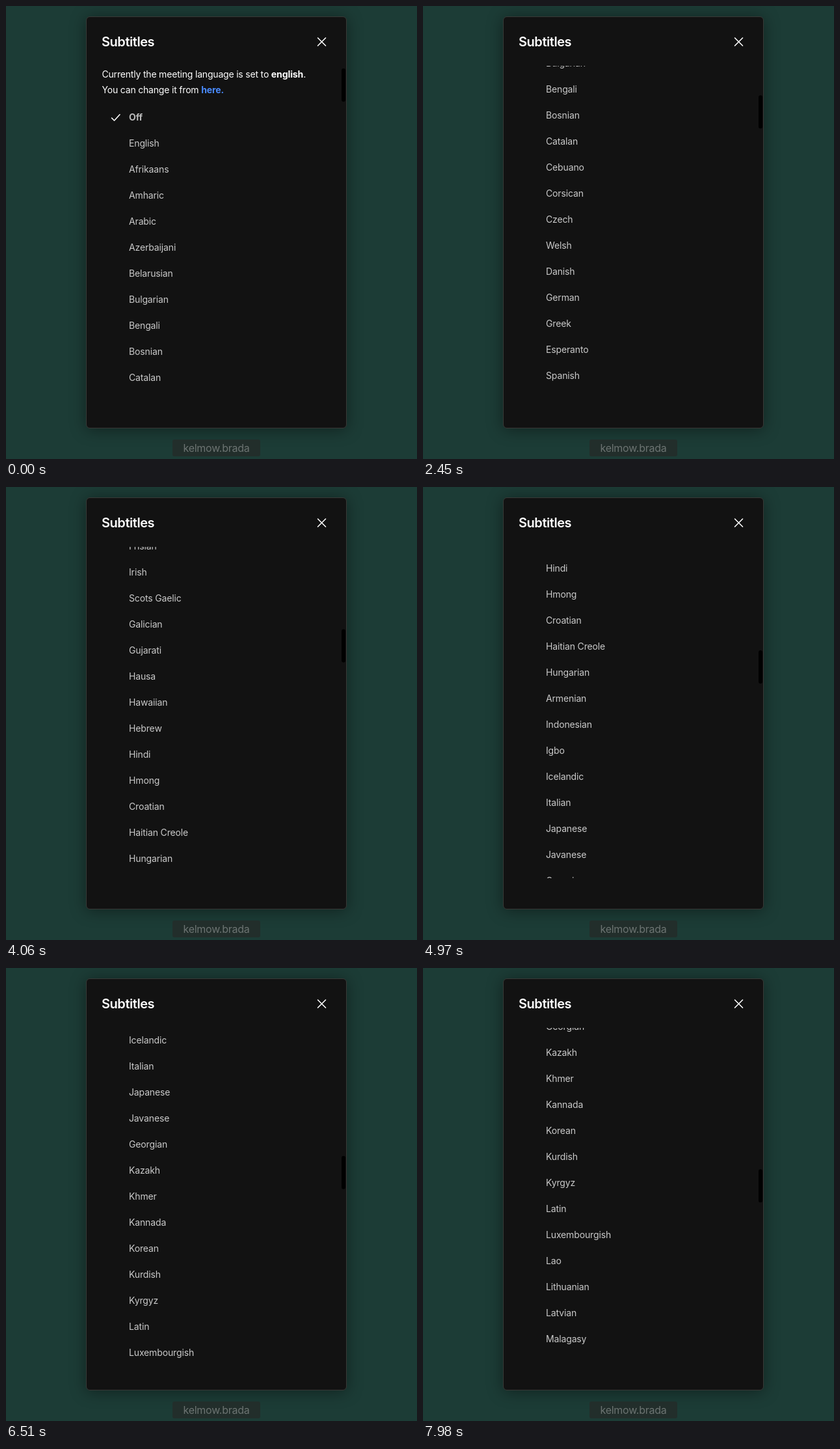
An HTML page that plays this animation: 632x696 px, repeating every 8000 ms.

```html
<!DOCTYPE html>
<html lang="en">
<head>
<meta charset="utf-8">
<title>Subtitles</title>
<style>
  html, body { margin: 0; width: 100%; height: 100%; overflow: hidden; background: #1c3c36; }
  body { position: relative; font: 14px/24px Inter, "Liberation Sans", sans-serif; color: #fff; }
  .panel {
    position: absolute; left: 123px; top: 16px; width: 399px; height: 631px;
    background: #121212; border: 1px solid #383a37; border-radius: 6px;
    box-shadow: 0 2px 24px rgba(0, 0, 0, .42);
  }
  h1 {
    position: absolute; left: 147px; top: 40px; margin: 0;
    font-size: 20px; line-height: 31px; font-weight: 600; letter-spacing: -.45px;
  }
  svg { position: absolute; overflow: visible; fill: none; stroke: #fff; stroke-width: 1.6; stroke-linecap: round; stroke-linejoin: round; }
  .close { left: 479px; top: 48px; }
  .view { position: absolute; left: 124px; top: 92px; width: 390px; height: 509px; overflow: hidden; }
  .content { position: absolute; left: 0; top: 0; width: 100%; }
  p { position: absolute; left: 23.5px; top: 1px; margin: 0; white-space: nowrap; letter-spacing: -.19px; }
  b { font-weight: 700; letter-spacing: -.1px; }
  .link { color: #4a8bff; }
  .check { left: 38px; top: 74px; }
  ul { position: absolute; left: 65px; top: 59px; margin: 0; padding: 0; list-style: none; }
  li { height: 40px; line-height: 40px; white-space: nowrap; color: #cacaca; letter-spacing: -.14px; }
  li:first-child { font-weight: 700; color: #b9b9b9; }
  .thumb { position: absolute; left: 516px; top: 96px; width: 6px; height: 51px; border-radius: 3px; background: #000; }
  .tag {
    position: absolute; left: 256px; top: 666px; width: 135px; height: 26px; border-radius: 3px;
    background: #222e2b; color: #6c7472; text-align: center; font-size: 16px; line-height: 26px; letter-spacing: -.25px;
  }
</style>
</head>
<body>
<div class="panel"></div>
<h1>Subtitles</h1>
<svg class="close" width="13" height="14"><path d="M0.5 1L12.5 13M12.5 1L0.5 13"/></svg>
<div class="view">
  <div class="content" id="content">
    <p>Currently the meeting language is set to <b>english</b>.<br>You can change it from <b class="link">here.</b></p>
    <svg class="check" width="13" height="11"><path d="M0.5 6L4.5 10L13 0.8"/></svg>
    <ul id="list"></ul>
  </div>
</div>
<div class="thumb" id="thumb"></div>
<div class="tag">kelmow.brada</div>
<script>
  const LOOP = 8000, TICK = 70, THUMB_RATIO = 0.1134;

  const languages = `Off,English,Afrikaans,Amharic,Arabic,Azerbaijani,Belarusian,Bulgarian,Bengali,Bosnian,
    Catalan,Cebuano,Corsican,Czech,Welsh,Danish,German,Greek,Esperanto,Spanish,Estonian,Basque,Persian,
    Finnish,French,Frisian,Irish,Scots Gaelic,Galician,Gujarati,Hausa,Hawaiian,Hebrew,Hindi,Hmong,Croatian,
    Haitian Creole,Hungarian,Armenian,Indonesian,Igbo,Icelandic,Italian,Japanese,Javanese,Georgian,Kazakh,
    Khmer,Kannada,Korean,Kurdish,Kyrgyz,Latin,Luxembourgish,Lao,Lithuanian,Latvian,Malagasy,Maori,Macedonian`;

  // Each swipe: start in ms, number of ticks, scroll offset reached.
  const swipes = [
    [490, 8, 64], [1120, 7, 220.1], [1680, 7, 300], [2310, 5, 375],
    [2940, 7, 735], [3710, 8, 1103], [4550, 7, 1366.5], [5530, 6, 1688],
    [6230, 12, 1706.2], [7210, 5, 1784], [7770, 4, 1881.5]
  ];

  const content = document.getElementById('content');
  const thumb = document.getElementById('thumb');
  const list = document.getElementById('list');
  for (const name of languages.split(',')) {
    list.appendChild(document.createElement('li')).textContent = name.trim();
  }

  const easeOut = u => 1 - (1 - u) ** 2;

  function scrollAt(ms) {
    const tick = Math.floor(ms / TICK + 1e-6);
    let pos = 0;
    for (const [start, ticks, end] of swipes) {
      const done = tick - start / TICK + 1;
      if (done <= 0) break;
      pos += (end - pos) * easeOut(Math.min(done / ticks, 1));
    }
    return pos;
  }

  function draw(now) {
    const y = scrollAt(now % LOOP);
    content.style.transform = `translateY(${-y}px)`;
    thumb.style.transform = `translateY(${y * THUMB_RATIO}px)`;
  }

  const origin = performance.now();
  function loop() {
    draw(performance.now() - origin);
    requestAnimationFrame(loop);
  }
  loop();
</script>
</body>
</html>
```
